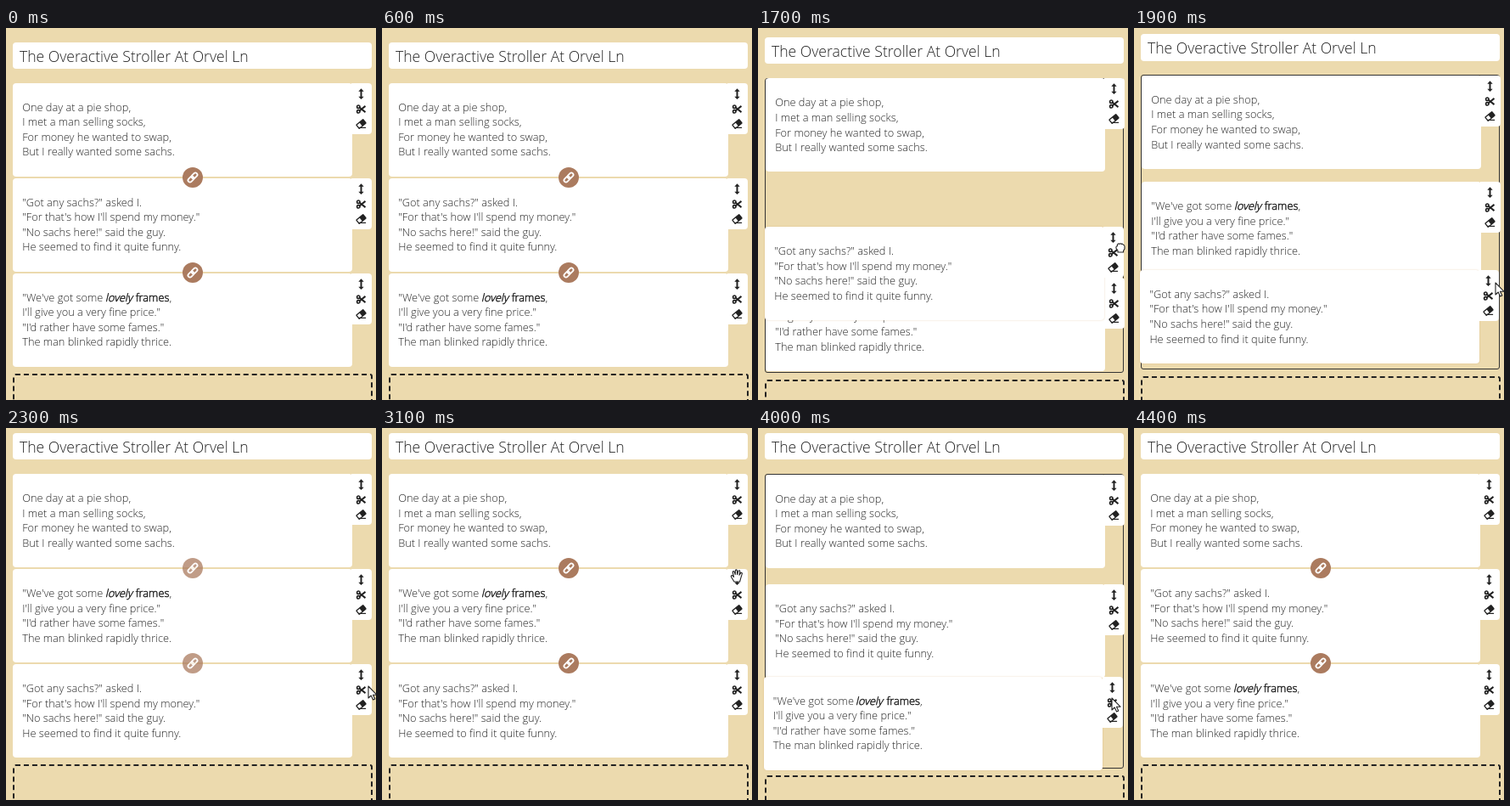
An HTML page for the animation above (4800 ms loop, 436x438 px).

```html
<!DOCTYPE html>
<html lang="en">
<head>
<meta charset="utf-8">
<title>Poem editor</title>
<style>
  html, body { margin: 0; width: 100%; height: 100%; overflow: hidden; }
  body { background: #ecdaae; color: #262626; font: 300 12.8px/17.6px "Open Sans", sans-serif; }
  #stage { position: relative; width: 436px; height: 438px; overflow: hidden; background: #ecdaae; }
  #stage div, #stage svg { position: absolute; box-sizing: border-box; }
  svg { overflow: visible; }
  #page { left: 0; width: 436px; height: 600px; }
  #title { left: 8px; top: 16.6px; width: 423px; height: 31.4px; padding-left: 8px; border-radius: 4px;
    background: #fff; font-size: 17.6px; line-height: 33px; white-space: pre; }
  #list { left: 8px; top: 64.6px; width: 423px; height: 347px; border: 1px solid #333; border-radius: 3px; }
  #drop { left: 8px; width: 423.5px; height: 120px; border: 2px dashed #222; border-radius: 3px; }
  .card { width: 399.5px; height: 110px; padding: 20px 0 0 11.2px; border-radius: 4px;
    background: #fff; white-space: pre; }
  .card.held { z-index: 2; box-shadow: 0 0 2px rgba(205, 150, 80, .4); }
  .tools { left: 399px; top: 0; width: 24px; height: 60px; border-radius: 0 4px 4px 0; background: #fff; }
  .link { width: 1px; height: 1px; left: 219.5px; z-index: 1; }
  #cursor { z-index: 5; width: 1px; height: 1px; }
  b, i { font-weight: 300; font-style: normal; -webkit-text-stroke: .5px #262626; }
  i { display: inline-block; transform: skewX(-13deg); }
</style>
</head>
<body>
<div id="stage">
  <div id="page">
    <div id="title">The Overactive Stroller At Orvel Ln</div>
    <div id="list"></div>
    <div id="drop"></div>
  </div>
  <svg id="cursor"></svg>
</div>
<script>
const LOOP = 4800, STEP = 100;
const LEFT = 8, TOP = 64.6, PITCH = 112, SCROLL = 10.6;
const $ = id => document.getElementById(id);
const page = $("page"), list = $("list"), drop = $("drop"), cursor = $("cursor");

const poem = [
  `One day at a pie shop,
I met a man selling socks,
For money he wanted to swap,
But I really wanted some sachs.`,
  `"Got any sachs?" asked I.
"For that's how I'll spend my money."
"No sachs here!" said the guy.
He seemed to find it quite funny.`,
  `"We've got some <i>lovely</i> <b>frames</b>,
I'll give you a very fine price."
"I'd rather have some fames."
The man blinked rapidly thrice.`
];

const toolIcons = `<svg fill="#222">
  <path class="handle" transform="translate(11.5 12.7)" d="M0-6.4 3.2-3H1V3H3.2L0 6.4-3.2 3H-1V-3H-3.2Z"/>
  <g transform="translate(11.5 30.5)" fill="none" stroke="#222" stroke-width="1.7">
    <circle cx="-3.2" cy="-2.8" r="1.7"/><circle cx="-3.2" cy="2.8" r="1.7"/>
    <path d="M-2-2 5 3.6M-2 2 5-3.6" stroke-width="2"/>
  </g>
  <g transform="translate(11.5 48)">
    <g transform="rotate(-40)">
      <rect x="-5.8" y="-3.4" width="11.6" height="6.8" rx="1.2"/>
      <rect x="-4.5" y="-2.1" width="4" height="4.2" fill="#fff"/>
    </g>
    <rect x="-3" y="3.8" width="8.6" height="1.2"/>
  </g></svg>`;

const linkIcon = `<circle r="12" fill="#ab7b5f"/>
  <g transform="rotate(-45)" fill="none" stroke="#fff" stroke-width="1.8">
    <rect x="-6.8" y="-2.3" width="7.8" height="4.6" rx="2.3"/>
    <rect x="-1" y="-2.3" width="7.8" height="4.6" rx="2.3"/>
  </g>`;

const outline = d => `<path d="${d}" fill="#fff" stroke="#222" stroke-width="1.1" stroke-linejoin="round"/>`;
const cursors = {
  arrow: outline("M0 0V14L3.2 11 5.6 16 7.8 15 5.5 10.2H10Z"),
  open: outline("M-3 7-6.4 1.5Q-7.2-.6-5.2-.4L-3.4 1.4-4.8-4.2Q-4.6-6-3-5L-1.7-1.4-1.6-6.4Q-.6-7.8.4-6.4L.6-1.5 2-5.8Q3.4-6.8 3.9-5.2L3-.8 4.7-3.4Q6.3-4.2 6.4-2.6L4.6 3.4 3.6 7Z"),
  fist: outline("M-3 6V4L-5 1.4Q-5.4-1-3.6-1.2V-3Q-2.4-4.8-1.2-3.6 .2-5 1.2-3.6 2.6-4.4 3.4-2.8 5-2.8 5-.8V2L3.6 4.4V6Z")
};

function add(tag, cls, html) {
  const el = tag === "svg"
    ? document.createElementNS("http://www.w3.org/2000/svg", "svg")
    : document.createElement(tag);
  el.setAttribute("class", cls);
  el.innerHTML = html;
  page.appendChild(el);
  return el;
}
const cards = poem.map(text => add("div", "card", text + `<div class="tools">${toolIcons}</div>`));
const links = [0, 1].map(() => add("svg", "link", linkIcon));

// Each drag takes the middle card to the bottom; the pointer slides from grip[0] to grip[1] on it.
const first = { start: 1400, end: 2000, drop: 2100, card: 1, other: 2, sway: 5.5, turns: 2, gap: 16, hold: 419, grip: [36, 11] };
const second = { start: 3100, end: 4030, drop: 4100, card: 2, other: 1, sway: -13.4, turns: 1, gap: 20, hold: 410, grip: [8, 26] };

const ramp = (t, a, b) => Math.max(0, Math.min(1, (t - a) / (b - a)));
const smooth = u => u * u * (3 - 2 * u);
const easeOut = u => 1 - (1 - u) ** 2;
const mix = (a, b, u) => a + (b - a) * u;
const mixPoint = (p, q, u) => p.map((v, i) => mix(v, q[i], u));

const progress = (d, t) => ramp(t, d.start, d.end);
const scrollAt = t => SCROLL * easeOut(ramp(t, 1500, 2100));

function heldAt(d, t) {
  const u = progress(d, t);
  const x = LEFT + d.sway * Math.sin(Math.PI * d.turns * u) * (1 - u) ** (d.turns - 1);
  return [x, TOP + PITCH + (PITCH + 15) * smooth(u)];
}

function gripAt(d, t) {
  const [x, y] = heldAt(d, t);
  return [x + d.hold, y - scrollAt(t) + mix(...d.grip, progress(d, t))];
}

function pointerAt(t) {
  if (t < first.start) return mixPoint([448, 236], gripAt(first, first.start), smooth(ramp(t, 700, 1200)));
  if (t < first.drop) return gripAt(first, t);
  if (t < second.start) return mixPoint(gripAt(first, first.drop), gripAt(second, second.start), smooth(ramp(t, 2600, 2900)));
  if (t < second.drop) return gripAt(second, t);
  return mixPoint(gripAt(second, second.drop), [448, 312], ramp(t, second.drop, 4400));
}

function cursorKind(t) {
  for (const d of [first, second]) {
    const u = progress(d, t);
    if (u > 0 && u < .8) return "fist";
    if (t >= d.start - 200 && t <= d.start) return "open";
  }
  return "arrow";
}

function place(el, x, y) {
  el.style.left = x + "px";
  el.style.top = y + "px";
}

let shown = "";
function drawCursor(t) {
  const kind = cursorKind(t);
  cursor.style.display = t >= 700 && t < 4400 ? "" : "none";
  if (kind !== shown) cursor.innerHTML = cursors[shown = kind];
  place(cursor, ...pointerAt(t));
}

function draw(t) {
  const drag = [first, second].find(d => t > d.start && t < d.drop);
  const order = t >= first.drop && t < second.drop ? [0, 2, 1] : [0, 1, 2];
  const lastDrop = t >= second.drop ? second.drop : t >= first.drop ? first.drop : -LOOP;

  page.style.top = -scrollAt(t) + "px";
  list.style.display = drag ? "" : "none";
  drop.style.top = (drag ? 419.6 : 406.6) + "px";
  order.forEach((id, i) => place(cards[id], LEFT, TOP + PITCH * i));
  cards.forEach((card, i) => card.classList.toggle("held", !!drag && drag.card === i));

  if (drag) {
    const swapped = progress(drag, t) > .5;
    place(cards[0], LEFT + 1, TOP + .6);
    place(cards[drag.other], LEFT + 1, TOP + 110 + (swapped ? drag.gap : 125));
    place(cards[drag.card], ...heldAt(drag, t));
  }

  links.forEach((link, i) => {
    link.style.top = TOP + 111 + (drag ? 11 : PITCH) * i + "px";
    link.style.opacity = drag
      ? .4 * (1 - ramp(t, drag.start + 100, drag.start + 200))
      : ramp(t, lastDrop - 100, lastDrop + 300);
  });
  drawCursor(t);
}

const start = performance.now();
function tick() {
  const t = (performance.now() - start) % LOOP;
  draw(Math.floor(t / STEP) * STEP);
  requestAnimationFrame(tick);
}
draw(0);
requestAnimationFrame(tick);
</script>
</body>
</html>
```
